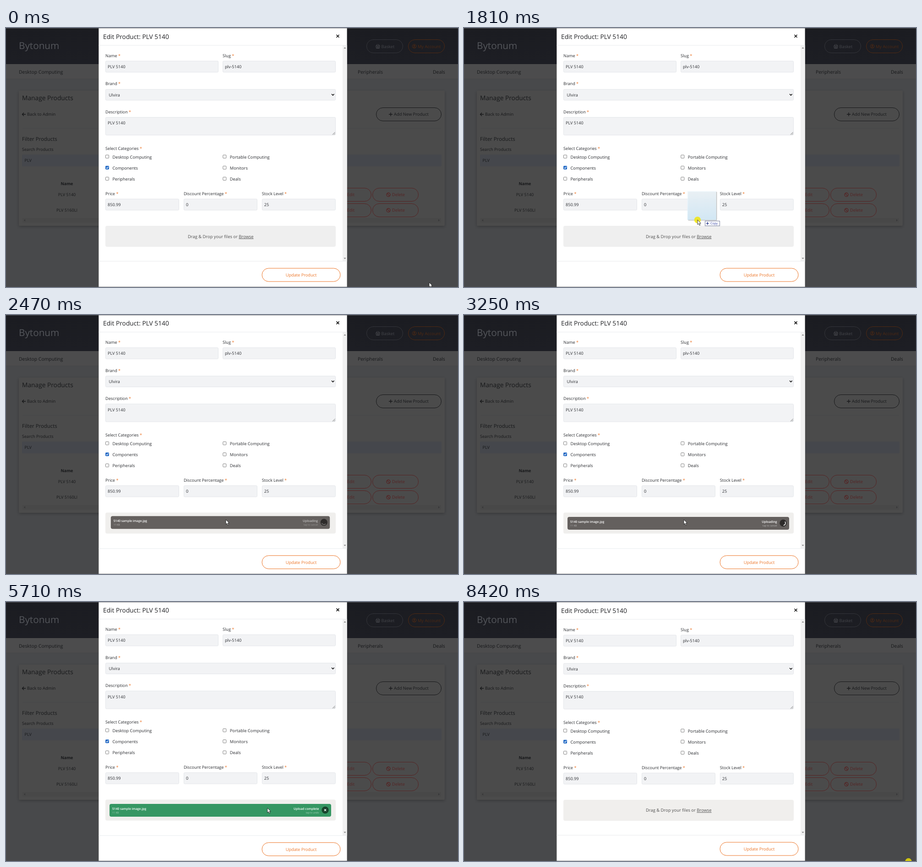
An HTML page that plays this animation: 987x567 px, repeating every 8.49 s.

```html
<!DOCTYPE html>
<html lang="en">
<head>
<meta charset="utf-8">
<title>Edit product</title>
<style>
html, body { margin: 0; width: 100%; height: 100%; overflow: hidden; background: #48494b; }
svg { display: block; width: 987px; height: 567px; }
text { font-family: "Open Sans", "Noto Sans", sans-serif; text-rendering: geometricPrecision; white-space: pre; }
</style>
</head>
<body>
<svg id="stage" viewBox="0 0 987 567"></svg>
<script>
const LOOP = 8490;
const INK = '#17181a', BODY = '#2b2d31', ORANGE = '#ec7426', RED = '#552424', AMBER = '#502a13';

const text = (x, y, s, { size = 9.25, fill = BODY, anchor = 'start', weight = 400, id = '' } = {}) =>
  `<text ${id && `id="${id}"`} x="${x}" y="${y + size * 0.355}" font-size="${size}" fill="${fill}" text-anchor="${anchor}" font-weight="${weight}">${s}</text>`;
const rect = (x, y, w, h, fill, extra = '') =>
  `<rect x="${x}" y="${y}" width="${w}" height="${h}" fill="${fill}" ${extra}/>`;
const line = (d, stroke, width = 1, extra = '') =>
  `<path d="${d}" fill="none" stroke="${stroke}" stroke-width="${width}" ${extra}/>`;
const pill = (x, y, w, h, stroke) =>
  rect(x + .5, y + .5, w - 1, h - 1, 'none', `rx="${(h - 1) / 2}" stroke="${stroke}"`);
const label = (x, y, s) => text(x, y, `${s} <tspan fill="${ORANGE}">*</tspan>`, { size: 9.15 });
const field = (x, y, w, h, value = '', pad = 5) =>
  rect(x + .5, y + .5, w - 1, h - 1, '#f2f3f5', 'rx="2" stroke="#e4e6ea"') +
  text(x + pad, y + 13, value, { size: 9.1 });
const checkbox = (x, y, s, on) =>
  rect(x + .5, y - 4, 7, 7, on ? '#2068c4' : '#fff', `rx="1" stroke="${on ? '#2068c4' : '#777'}" stroke-width=".9"`) +
  (on ? line(`M${x + 2} ${y - .5}l1.6 1.8 2.8 -3.6`, '#fff', 1.2) : '') +
  text(x + 15.5, y + .5, s);

function page() {
  const row = (y, name) =>
    text(133, y, name, { size: 9.1, fill: INK, anchor: 'middle' }) +
    pill(696, y - 15, 102, 30, RED) + text(744.5, y, 'Edit', { fill: RED }) +
    pill(800, y - 15, 101, 30, RED) + text(843, y, 'Delete', { fill: RED }) +
    `<circle cx="835" cy="${y}" r="4" fill="none" stroke="${RED}" stroke-width="1.3"/>` +
    line(`M832.3 ${y - 2.7}l5.4 5.4`, RED, 1.3);
  return rect(0, 0, 987, 567, '#48494b') +
    rect(0, 0, 987, 79, 'url(#bar)') + rect(0, 0, 987, 1, '#505154') +
    text(28, 38.5, 'Bytonum', { size: 20.7, fill: '#54565b' }) +
    pill(787, 25, 80, 30, '#34353a') + text(819.5, 40.5, 'Basket', { fill: '#45464b' }) +
    line('M807 39h10M808 40l1 4.5h6l1 -4.5M809 38.5l2 -3M815 38.5l-2 -3M811 40v4M813 40v4', '#45464b', 1.2) +
    pill(878, 25, 80, 30, AMBER) + text(899, 40.5, 'My Account', { fill: AMBER }) +
    `<circle cx="891.5" cy="40" r="4.3" fill="none" stroke="${AMBER}"/><circle cx="891.5" cy="38.8" r="1.5" fill="${AMBER}"/>` +
    line('M889 43q2.5 -3 5 0', AMBER, 1.2) +
    rect(0, 79, 987, 32, '#4c4c4d') + rect(0, 111, 987, 1, '#444548') +
    [[28, 'Desktop Computing'], [768, 'Peripherals'], [932, 'Deals']]
      .map(([x, s]) => text(x, 96, s, { size: 10.4, fill: INK })).join('') +
    rect(28, 137, 930, 296, '#4c4c4c', 'rx="3" filter="url(#soft)"') +
    text(35, 153.5, 'Manage Products', { size: 13.75, fill: INK }) +
    line('M43 189h-7M39 185.5l-3.5 3.5 3.5 3.5', INK, 1.4) + text(46, 189, 'Back to Admin', { fill: INK }) +
    pill(808, 174, 143, 30, INK) + line('M836 189h8M840 185v8', INK, 1.3) +
    text(847, 189, 'Add New Product', { size: 9.35, fill: INK }) +
    rect(36, 219, 914, 1, '#464749') +
    text(35, 243, 'Filter Products', { size: 11.4, fill: INK }) +
    text(35, 265.5, 'Search Products', { size: 9.1, fill: INK }) +
    rect(35, 277, 916, 26, '#45474c', 'rx="2"') + text(40.5, 290, 'PLV', { size: 9.1, fill: INK }) +
    text(133, 340.5, 'Name', { size: 9, fill: INK, weight: 700, anchor: 'middle' }) +
    row(365, 'PLV 5140') + row(399, 'PLV 5160LI') +
    rect(36, 416, 914, 10, '#484848') +
    '<path d="M42 418.5v5l-3 -2.5zM944 418.5v5l3 -2.5z" fill="#363638"/>';
}

function modal() {
  const options = [['Desktop Computing', 'Portable Computing'], ['Components', 'Monitors'], ['Peripherals', 'Deals']];
  return rect(202.4, .6, 542.2, 565.9, '#fff') +
    rect(735, 38, 9.6, 473, '#f1f1f1') +
    '<path d="M737.5 45h5l-2.5 -3zM737.5 503h5l-2.5 3z" fill="#8a8a8a"/>' +
    '<g id="content">' +
    text(212, 19, 'Edit Product: PLV 5140', { size: 13.75, fill: '#1e1f22' }) +
    line('M721.5 14.8l6 6M727.5 14.8l-6 6', '#111', 1.6) + rect(202.4, 37.5, 542.2, 1, '#e9ebee') +
    label(217, 60.5, 'Name') + field(217, 71.8, 247, 25.5, 'PLV 5140') +
    label(473, 60.5, 'Slug') + field(473, 71.8, 247, 25.5, 'plv-5140') +
    label(217, 122, 'Brand') + field(217, 133.8, 503, 24.8, 'Ulvira', 7.5) +
    line('M711 144.5l2.8 2.8 2.8 -2.8', '#111', 1.6) +
    label(217, 183.5, 'Description') + field(217, 195, 503, 40, 'PLV 5140') +
    line('M713 233.5l5.5 -5.5M716 233.5l2.5 -2.5', '#666', .9) +
    label(217, 263.5, 'Select Categories') +
    options.map((pair, r) => pair.map((s, c) => checkbox(217 + 256.3 * c, 282 + 24.2 * r, s, r === 1 && c === 0)).join('')).join('') +
    [['Price', '850.99'], ['Discount Percentage', '0'], ['Stock Level', '25']]
      .map(([s, v], i) => label(217 + 170.9 * i, 362.5, s) + field(217 + 170.9 * i, 373.8, 161, 25.5, v)).join('') +
    '</g>' +
    '<g id="footer">' + rect(202.4, 510, 542.2, 1, '#e9ebee') +
    pill(558.5, 525.5, 172, 30, ORANGE) + text(644.5, 541, 'Update Product', { size: 9.2, fill: ORANGE, anchor: 'middle' }) + '</g>' +
    rect(217, 433, 503, 46, '#efefef', 'rx="4" id="drop"') +
    '<g id="hint">' + text(397, 456.5, 'Drag &amp; Drop your files or <tspan text-decoration="underline" style="text-decoration-color:#999">Browse</tspan>', { size: 9.38, fill: '#4f4f4f' }) + '</g>';
}

function upload() {
  const small = { size: 5.3, fill: '#ffffff90' };
  const strong = { size: 6.75, fill: '#fff', weight: 600 };
  const cross = (x, y) => line(`M${x - 2} ${y - 2}l4 4M${x + 2} ${y - 2}l-4 4`, '#fff', 1.3);
  return '<g id="item">' + rect(226, 442, 484, 28, '#64605e', 'rx="4" id="itemBox"') +
    '<g id="file">' + text(232, 452.3, '5140 sample image.jpg', strong) + text(232, 460.7, '11 KB', small) + '</g>' +
    '<g id="status">' + text(683.5, 452.3, '', { ...strong, anchor: 'end', id: 'state' }) +
    text(683.5, 460.7, '', { ...small, anchor: 'end', id: 'action' }) + '</g>' +
    '<circle cx="697" cy="455.5" r="7.7" fill="#000" fill-opacity=".55"/>' +
    line('', '#fff', 1.5, 'id="ring" stroke-linecap="round"') +
    `<g id="undo">${cross(697, 455.5)}</g>` +
    '<g id="idle"><circle cx="239.5" cy="455.5" r="7.7" fill="#000" fill-opacity=".5"/>' + cross(239.5, 455.5) +
    '<path d="M697 451.5l3 3.5h-2v2h-2v-2h-2zM694 458h6v1.2h-6z" fill="#fff"/></g></g>';
}

function pointer() {
  return '<g id="pointer">' +
    '<g id="ghost">' + rect(-20.5, -61.5, 63, 63, '#999', 'opacity=".6" rx="1"') + rect(-22, -63, 63, 63, 'url(#sheet)') +
    rect(16.5, 2.5, 32, 10.5, '#fff', 'stroke="#6b7394" stroke-width=".9"') +
    line('M18.8 7.7h6M21.8 4.7v6', '#22338c', 1.3) + text(28, 7.6, 'Copy', { size: 6.9, fill: '#2a3aa0' }) + '</g>' +
    '<circle id="press" r="7.2" fill="#f2e500" opacity=".8"/>' +
    '<path id="arrow" d="M0 0V10.2L2.4 8 4.2 12 6 11.2 4.3 7.4H7.3Z" fill="#fff" stroke="#111" stroke-width=".8"/></g>';
}

document.getElementById('stage').innerHTML = `<defs>
  <linearGradient id="bar" x2="0" y2="1"><stop stop-color="#1b1c21"/><stop offset="1" stop-color="#1d1e24"/></linearGradient>
  <linearGradient id="sheet" x2="0" y2="1"><stop stop-color="#f0f8fd" stop-opacity=".85"/><stop offset="1" stop-color="#d3eaf8" stop-opacity=".92"/></linearGradient>
  <filter id="soft"><feDropShadow dx="0" dy="2" stdDeviation="3" flood-opacity=".25"/></filter>
</defs>` + page() + modal() + upload() + pointer();

const el = Object.fromEntries([...document.querySelectorAll('[id]')].map(n => [n.id, n]));
const show = (node, amount) => node.setAttribute('opacity', Number(amount));
const place = (node, x, y) => node.setAttribute('transform', `translate(${x} ${y})`);
const within = (t, a, b) => t >= a && t < b;
const ramp = (t, a, b) => Math.min(1, Math.max(0, (t - a) / (b - a)));
const ease = (t, a, b) => { const k = ramp(t, a, b); return k * k * (3 - 2 * k); };
const mix = (a, b, k) => a + (b - a) * k;
const blend = (a, b, k) => `rgb(${a.map((v, i) => Math.round(mix(v, b[i], k)))})`;

const PATH = [
  [0, 924, 557], [70, 924, 557], [140, 930, 575], [1459, 930, 575],
  [1460, 932, 242], [1670, 625, 346], [1740, 562, 378], [1810, 510, 420], [2000, 488, 440], [2270, 480, 448],
  [3250, 480, 448], [3500, 477, 451], [5300, 477, 451], [5710, 570.5, 451], [6130, 699, 453],
  [7290, 699, 453], [7900, 892, 521], [7901, 970.5, 568], [LOOP, 970.5, 568]
];
function pointerAt(t) {
  const i = Math.max(1, PATH.findIndex(p => p[0] > t));
  const [a, b] = [PATH[i - 1], PATH[i]], k = ramp(t, a[0], b[0]);
  return [mix(a[1], b[1], k), mix(a[2], b[2], k)];
}

const GREY = [100, 96, 94], GREEN = [54, 151, 99], FADED = [102, 111, 103];

function arc(turn, start) {
  const point = a => `${697 + 5 * Math.sin(a)} ${455.5 - 5 * Math.cos(a)}`;
  const from = start * 2 * Math.PI;
  return `M${point(from)}A5 5 0 ${turn > .5 ? 1 : 0} 1 ${point(from + turn * 2 * Math.PI)}`;
}

function drawItem(t) {
  const enter = ease(t, 2310, 2620), leave = ramp(t, 6560, 7060);
  const scale = mix(.975, 1, enter) * (1 - .1 * leave);
  const lift = -3.5 * (1 - enter) + 1.5 * leave;
  const present = within(t, 2340, 7100);
  const complete = t >= 4600, reverted = t >= 6460;
  show(el.item, present ? ramp(t, 2290, 2400) * (1 - leave ** 2) : 0);
  el.item.setAttribute('transform', `translate(468 ${456 + lift}) scale(${scale} ${mix(1, scale, leave)}) translate(-468 -456)`);
  el.itemBox.setAttribute('fill', reverted
    ? blend(GREEN, FADED, ramp(t, 6460, 6680))
    : blend(GREY, GREEN, ramp(t, 4600, 4900)));

  const percent = Math.round(t < 4410
    ? 65 * ramp(t, 3250, 4060) + 10 * ramp(t, 4100, 4270)
    : mix(75, 100, ramp(t, 4490, 4590)));
  el.state.textContent = complete ? 'Upload complete' : percent ? `Uploading ${percent}%` : 'Uploading';
  el.action.textContent = complete ? 'tap to undo' : 'tap to cancel';
  show(el.status, reverted ? 1 - ramp(t, 6460, 6600) : ramp(t, 2270, 2600));
  show(el.ring, complete ? 0 : mix(.35, 1, ramp(t, 2470, 2700)));
  el.ring.setAttribute('d', percent ? arc(Math.max(.08, percent / 100 * .85), 0) : arc(.3, .38 + (t - 2470) / 1000));
  show(el.undo, complete && !reverted);
  show(el.idle, ramp(t, 6460, 6600) * .8);
  place(el.file, 18.5 * ease(t, 6460, 6680), 0);
}

function render(t) {
  const open = within(t, 2340, 6460);
  place(el.content, 0, open ? -.7 : 0);
  place(el.footer, 0, open ? .7 : 0);
  place(el.drop, 0, open ? -.4 : 0);
  el.drop.setAttribute('fill', t < 2340 ? '#efefef' : '#f0efed');

  const back = ease(t, 6600, 7150);
  show(el.hint, t < 2340 ? 1 : t < 6460 ? 1 - ramp(t, 2340, 2440) : back);
  place(el.hint, 0, t < 6460 ? 0 : mix(13, -.5, back));
  drawItem(t);

  place(el.pointer, ...pointerAt(t));
  show(el.arrow, t < 140 || within(t, 1460, 7900));
  show(el.ghost, within(t, 1530, 2270));
  show(el.press, within(t, 1460, 2270) || within(t, 6210, 6280) || t >= 8420 ? .8 : 0);
}

function tick() {
  render(performance.now() % LOOP);
  requestAnimationFrame(tick);
}
tick();
</script>
</body>
</html>
```
